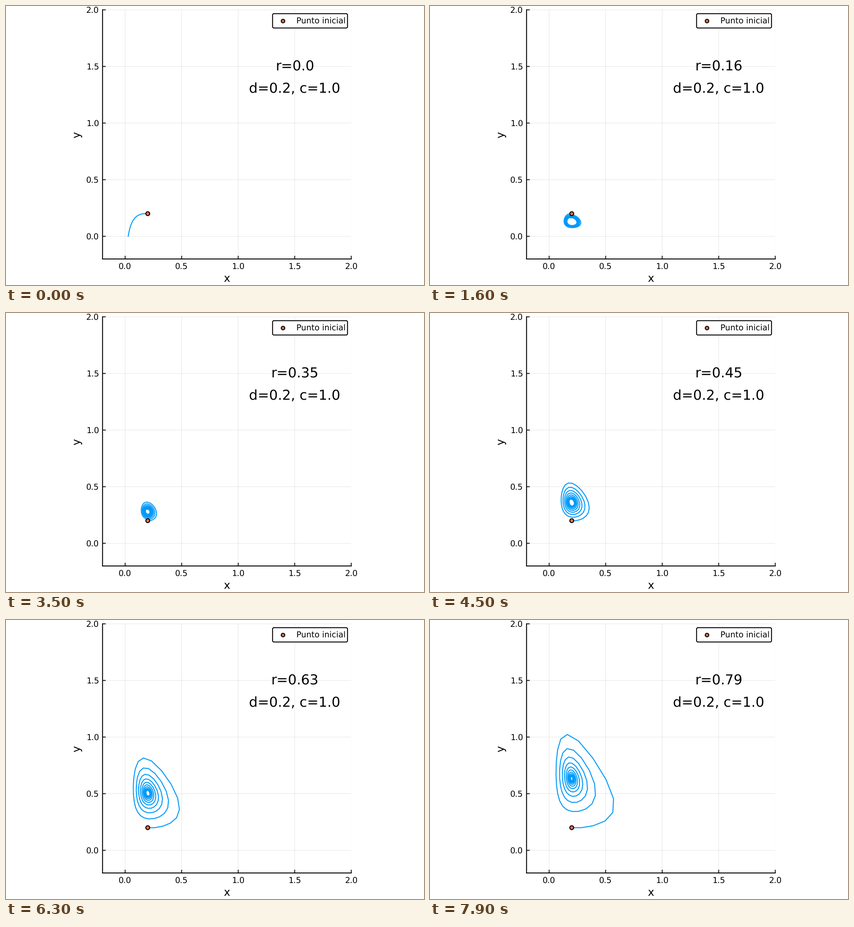
Recreate the animation shown at these times as a matplotlib script. Size 917 by 611 pixels, loop 8000 ms.

```python
import matplotlib.pyplot as plt
import numpy as np
from matplotlib.animation import FuncAnimation
from matplotlib.lines import Line2D
from matplotlib.patches import Circle, FancyBboxPatch
from matplotlib.transforms import Affine2D

W, H, DPI = 917, 611, 64
PX = 72 / DPI  # one pixel in points
LEFT, BOTTOM, SCALE = 211.8, 554, 248  # plot corner, pixels per unit
LOW, HIGH = -0.2, 2.0
SIDE = (HIGH - LOW) * SCALE
D, C = 0.2, 1.0
START = (0.2, 0.2)
STEPS = 200
BLUE, ORANGE = "#009afa", "#e26f46"
SMALL, MEDIUM, LARGE = 17.8, 23.6, 30

plt.rcParams.update({
    "font.family": "DejaVu Sans",
    "text.hinting": "none",
    "path.snap": False,
})

fig = plt.figure(figsize=(W / DPI, H / DPI), dpi=DPI, facecolor="white")
pixels = Affine2D().scale(1 / W, -1 / H).translate(0, 1) + fig.transFigure


def to_px(x, y):
    return LEFT + (x - LOW) * SCALE, BOTTOM - (y - LOW) * SCALE


def label(x, y, text, size, ha="center", **kw):
    return fig.text(x, y, text, fontsize=size * PX, ha=ha, va="baseline",
                    transform=pixels, color="black", **kw)


def dot(x, y, radius):
    fig.add_artist(Circle((x, y), radius, facecolor=ORANGE, edgecolor="black",
                          linewidth=2 * PX, transform=pixels))


def tick(x, y, dx, dy):
    fig.add_artist(Line2D([x, x + dx], [y, y + dy], color="black",
                          linewidth=1.8 * PX, solid_capstyle="butt",
                          transform=pixels))


def orbit(r):
    """Predator-prey model with logistic growth, explicit Euler, unit step."""
    pts = np.empty((STEPS + 1, 2))
    pts[0] = x, y = START
    for k in range(1, STEPS + 1):
        x, y = x + r * x * (1 - x) - C * x * y, y + C * x * y - D * y
        pts[k] = x, y
    return pts.T


# Axes
ax = fig.add_axes([LEFT / W, 1 - BOTTOM / H, SIDE / W, SIDE / H])
ax.set(xlim=(LOW, HIGH), ylim=(LOW, HIGH))
ticks = np.arange(0, 2.1, 0.5)
ax.set_xticks(ticks)
ax.set_yticks(ticks)
ax.set_axisbelow(True)
ax.grid(color="black", alpha=0.1, linewidth=PX)
ax.tick_params(length=0, labelbottom=False, labelleft=False)
ax.spines[["top", "right"]].set_visible(False)
ax.spines[["left", "bottom"]].set_linewidth(2 * PX)

for t in ticks:
    x, y = to_px(t, t)
    tick(x, BOTTOM, 0, -7)
    tick(LEFT, y, 7, 0)
    label(x, 575.5, f"{t:.1f}", SMALL)
    label(204, y + 6.5, f"{t:.1f}", SMALL, ha="right")
label(484.6, 604.5, "x", MEDIUM)
label(162.5, 282, "y", MEDIUM, rotation=90, rotation_mode="anchor")

# Legend
fig.add_artist(FancyBboxPatch(
    (584.8, 16.8), 164.4, 31.4, boxstyle="round,pad=0,rounding_size=3",
    facecolor="white", edgecolor="black", linewidth=2 * PX, transform=pixels))
dot(607.7, 33, 3.9)
label(637.3, 38, "Punto inicial", SMALL, ha="left")

# Parameters
r_text = label(633.5, 141, "", LARGE)
label(633.5, 191, f"d={D}, c={C}", LARGE)

curve, = ax.plot([], [], color=BLUE, linewidth=2.1 * PX, zorder=3)
dot(*to_px(*START), 4.3)


def update(i):
    r = round(i / 100, 2)
    curve.set_data(*orbit(r))
    r_text.set_text(f"r={r}")
    return curve, r_text


anim = FuncAnimation(fig, update, frames=80, interval=100,
                     repeat=True, repeat_delay=0, blit=False)
plt.show()
```
